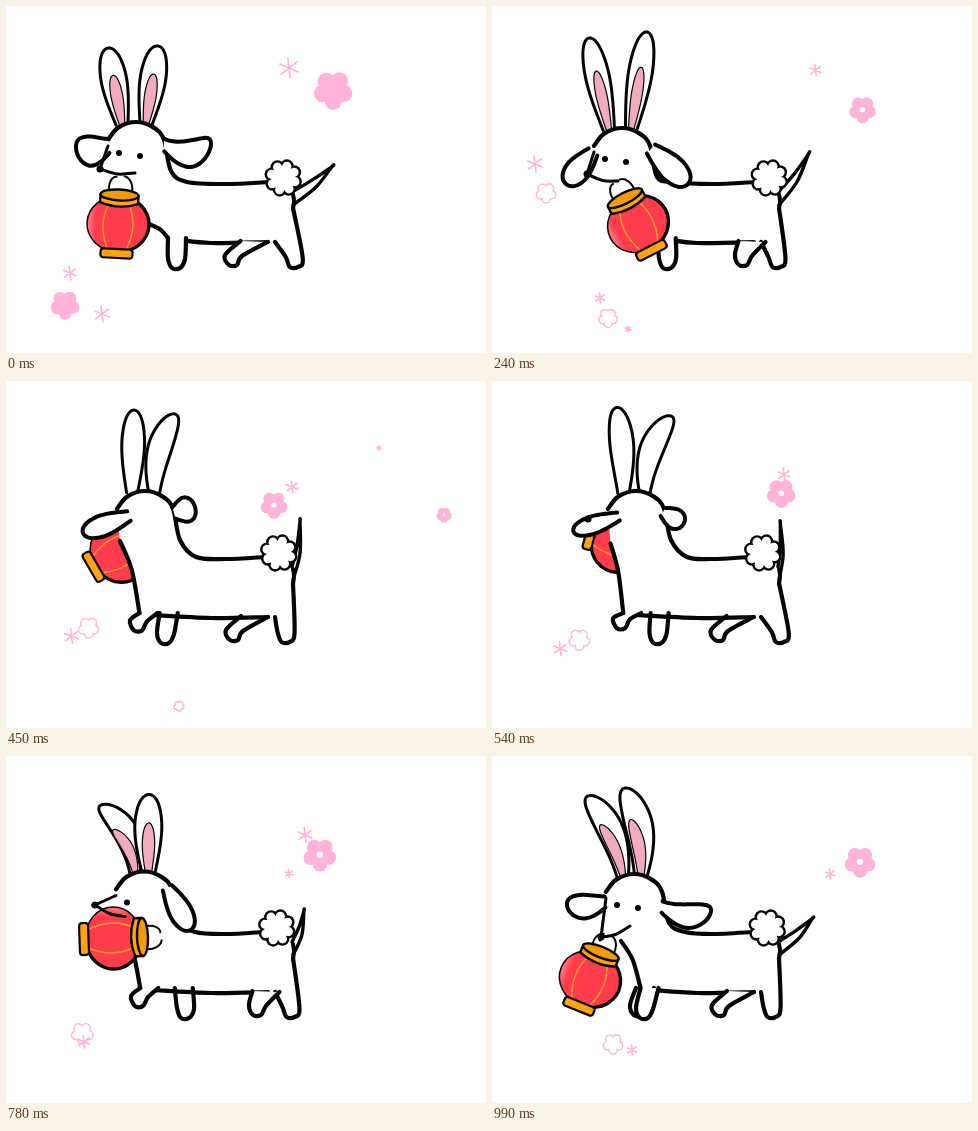
An HTML page with a canvas for the animation above (1.05 s loop, 480 by 347 pixels).

```html
<!DOCTYPE html>
<html lang="en">
<head>
<meta charset="utf-8">
<title>Lantern walk</title>
<style>
html, body { margin: 0; width: 100%; height: 100%; overflow: hidden; background: #fff; }
canvas { display: block; width: 100vw; height: 100vh; }
</style>
</head>
<body>
<canvas id="stage" width="480" height="347"></canvas>
<script>
const ctx = document.getElementById('stage').getContext('2d');
const LOOP = 1050, TICK = 30, STEPS = 10, POSE = LOOP / STEPS;
const INK = '#050505', PINK = '#ffb3da', EAR = '#f2abbd', RED = '#ff3c4c', GOLD = '#ffa30f';
const TAU = Math.PI * 2;

// Puppet poses by step. Ears: tip x, y, width, bend. Flops: root x, y, then the same.
// Face: nose from head centre, then mouth end from nose. Lamp: x, y, degrees.
const keys = {
  0: { head: [130, 147], spread: [12], earL: [102, 42, 27, 0], earR: [152, 40, 27, 0],
    flopL: [103, 140, 70, 142, 31, -8], flopR: [158, 139, 205, 137, 28, 20],
    face: [-36, 16, 35, 4], eyes: [2], throat: [143, 218], feet: [170, 170], lamp: [112, 218, 3] },
  1: { head: [130, 153], spread: [11], earL: [104, 37, 26, 0], earR: [159, 36, 27, 0],
    flopL: [102, 147, 71, 171, 22, 0], flopR: [160, 141, 203, 176, 25, 0],
    face: [-35, 14, 36, 4], eyes: [2], throat: [153, 230], feet: [170, 170], lamp: [129, 217, -17] },
  2: { head: [130, 153], spread: [11], earL: [97, 32, 25, 0], earR: [155, 26, 25, 0],
    flopL: [101, 146, 74, 178, 25, 0], flopR: [159, 143, 196, 178, 27, 0],
    face: [-35, 15, 31, 7], eyes: [2], throat: [160, 240], feet: [175, 175], lamp: [146, 218, -27] },
  4: { head: [139, 141], spread: [11], earL: [128, 29, 24, 0], earR: [169, 33, 25, -12],
    flopL: [123, 135, 77, 152, 22, 0], flopR: [168, 132, 189, 126, 26, 0],
    eyes: [0], throat: [114, 160], feet: [132, 159], lamp: [113, 171, 60], behind: true },
  6: { head: [149, 141], spread: [10], earL: [122, 24, 26, 8], earR: [189, 37, 25, -18],
    flopL: [130, 136, 86, 149, 15, 0], flopR: [174, 130, 194, 160, 16, 0],
    face: [-48, -3, 30, 10], eyes: [0], throat: [123, 165], feet: [126, 172], lamp: [141, 150, 150], behind: true },
  8: { head: [127, 152], spread: [3], earL: [68, 74, 25, 32], earR: [97, 40, 32, 16],
    flopR: [149, 134, 175, 188, 31, 0],
    face: [-50, 8, 30, 13], eyes: [1], throat: [107, 173], feet: [140, 186], lamp: [74, 214, 26] },
  9: { head: [142, 149], spread: [9], earL: [96, 40, 27, 14], earR: [133, 32, 29, 14],
    flopL: [113, 146, 75, 149, 25, -6], flopR: [170, 151, 219, 155, 25, 14],
    face: [-33, 32, 29, -11], eyes: [2], throat: [129, 185], feet: [152, 146], lamp: [98, 223, 22] }
};

// Drifting petals: look, first and last step, path ends, size ends, ease, sway.
const petals = [
  ['fh', 0, 4, 327, 84, 438, 134, 19, 7, 1.35, 0],
  ['*', 0, 4, 283, 62, 373, 67, 10, 2, 1.15, 0],
  ['*', 0, 2, 64, 267, 108, 292, 7, 5, 1, 0],
  ['*', 0, 2, 96, 308, 136, 323, 8, 3, 1, 0],
  ['fo', 0, 4, 59, 299, 173, 325, 14, 5, 1, 0],
  ['o', 2, 8, 54, 187, 64, 285, 10, 11, .45, 26],
  ['*', 2, 8, 43, 158, 84, 293, 8, 6, .3, -8],
  ['h', 4, 8, 268, 124, 324, 93, 13, 17, .7, 0],
  ['*', 4, 8, 286, 106, 302, 73, 6, 8, .7, 0],
  ['*', 6, 8, 275, 129, 291, 106, 2, 6, 1, 0],
  ['h', 9, 9, 368, 106, 0, 0, 15, 0, 1, 0],
  ['*', 9, 9, 338, 118, 0, 0, 5, 0, 1, 0],
  ['o', 9, 9, 121, 288, 0, 0, 10, 0, 1, 0],
  ['*', 9, 9, 140, 294, 0, 0, 5, 0, 1, 0]
];

const mix = (a, b, t) => a + (b - a) * t;

function pose(k) {
  if (keys[k]) return keys[k];
  const a = keys[k - 1], b = keys[k + 1], out = { behind: a.behind && b.behind };
  for (const part in a) {
    if (Array.isArray(a[part]) && b[part]) out[part] = a[part].map((v, i) => mix(v, b[part][i], .5));
  }
  out.face = out.face || a.face || b.face;
  return out;
}

function paint(fill, line, width) {
  if (fill) { ctx.fillStyle = fill; ctx.fill(); }
  if (line) { ctx.strokeStyle = line; ctx.lineWidth = width; ctx.stroke(); }
}

// Catmull-Rom through the points; a doubled point makes a corner.
function curve(pts) {
  ctx.beginPath();
  ctx.moveTo(...pts[0]);
  for (let i = 0; i < pts.length - 1; i++) {
    const [p, q, r, s] = [pts[i - 1] || pts[i], pts[i], pts[i + 1], pts[i + 2] || pts[i + 1]];
    ctx.bezierCurveTo(q[0] + (r[0] - p[0]) / 6, q[1] + (r[1] - p[1]) / 6,
      r[0] - (s[0] - q[0]) / 6, r[1] - (s[1] - q[1]) / 6, ...r);
  }
}

function disc(x, y, r, fill) {
  ctx.beginPath();
  ctx.arc(x, y, r, 0, TAU);
  paint(fill);
}

// Rounded lobe around a bent centre line, open at its root.
function lobe(x0, y0, x1, y1, width, bend) {
  const dx = x1 - x0, dy = y1 - y0, len = Math.hypot(dx, dy), left = [], right = [];
  for (let i = 0; i <= 20; i++) {
    const u = Math.sin(i / 20 * TAU / 4), arc = 2 * u * (1 - u) * bend;
    const rise = Math.sin(Math.min(1, u / .7) * TAU / 4);
    const half = width / 2 * (.45 + .55 * rise) * Math.sqrt(Math.max(0, 1 - u ** 5));
    const at = d => [x0 + dx * u - dy / len * d, y0 + dy * u + dx / len * d];
    left.push(at(arc - half));
    right.unshift(at(arc + half));
  }
  curve([...left, ...right]);
}

function ear(x, y, [tx, ty, width, bend], lining) {
  lobe(x, y, tx, ty, width, bend);
  paint('#fff', INK, 3);
  if (!lining) return;
  lobe(x, y, mix(x, tx, .64), mix(y, ty, .64), width * .46, bend * .45);
  paint(EAR, INK, 1.2);
}

function flop(shape) {
  if (!shape) return;
  lobe(...shape);
  paint('#fff', INK, 4);
}

function leg(x0, y0, x1, y1, fx, fy) {
  curve([[x0, y0], [fx - 8, fy - 11], [fx - 4, fy - 1], [fx + 4, fy - 1], [fx + 9, fy - 10], [x1, y1]]);
  paint('#fff', INK, 4.2);
}

function frontLeg(foot) {
  const hip = hipOf(foot);
  leg(hip - 9, 232, hip + 9, 232, foot, 263 - Math.max(0, 150 - foot) * .7);
}
const hipOf = foot => 156 + .75 * (foot - 150);

// Ring of discs, drawn larger for the outline and smaller for the fill.
function puff(x, y, r, n, fill, line, width) {
  const small = r * (n > 5 ? .32 : .42);
  for (const [grow, colour] of [[width / 2, line], [-width / 2, fill]]) {
    for (let i = 0; i < n; i++) {
      const a = .3 + i / n * TAU;
      disc(x + Math.cos(a) * (r - small), y + Math.sin(a) * (r - small), small + grow, colour);
    }
    disc(x, y, r - small, colour);
  }
}

function petal(k, [look, from, to, x0, y0, x1, y1, r0, r1, ease, sway]) {
  if (k < from || k > to) return;
  const age = (k - from) / (to - from || 1), e = age ** ease;
  const x = mix(x0, x1, e) + sway * Math.sin(age * Math.PI), y = mix(y0, y1, e), r = mix(r0, r1, age);
  const kind = age < .4 ? look[0] : look.slice(-1);
  if (kind === '*') {
    ctx.beginPath();
    for (let i = 0; i < 3; i++) {
      const a = .4 + i * TAU / 6, c = Math.cos(a) * r, s = Math.sin(a) * r;
      ctx.moveTo(x - c, y - s);
      ctx.lineTo(x + c, y + s);
    }
    return paint(null, PINK, 1.6);
  }
  puff(x, y, r, 5, kind === 'o' ? '#fff' : PINK, PINK, 1.4);
  if (kind === 'h') disc(x, y, r * .2, '#fff');
}

function lantern([x, y, deg]) {
  ctx.save();
  ctx.translate(x, y);
  ctx.rotate(deg * TAU / 360);

  ctx.beginPath();
  ctx.moveTo(-10, -30);
  ctx.bezierCurveTo(-13, -41, -8, -47, -4, -47);
  ctx.moveTo(12, -30);
  ctx.bezierCurveTo(14, -41, 9, -47, 4, -48);
  paint(null, INK, 2);

  const glow = ctx.createLinearGradient(-31, 0, 0, 0);
  glow.addColorStop(0, '#ff7f88');
  glow.addColorStop(.3, RED);
  ctx.beginPath();
  ctx.ellipse(0, 0, 31, 28, 0, 0, TAU);
  paint(glow, INK, 1.5);
  ctx.beginPath();
  ctx.ellipse(0, 0, 31, 28, 0, -1, 1.6);
  paint(null, INK, 3.4);

  ctx.beginPath();
  for (const s of [-1, 1]) {
    ctx.moveTo(s * 9, -22);
    ctx.quadraticCurveTo(s * 21, 0, s * 9, 26);
  }
  paint(null, '#ff9a2a', 1.5);

  ctx.beginPath();
  ctx.roundRect(-16, 25, 32, 9, 3);
  paint(GOLD, INK, 2.2);
  ctx.beginPath();
  ctx.moveTo(-19, -29);
  ctx.lineTo(-19, -21);
  ctx.quadraticCurveTo(0, -14, 19, -21);
  ctx.lineTo(19, -29);
  paint(GOLD, INK, 2.4);
  ctx.beginPath();
  ctx.ellipse(0, -29, 19, 5.5, 0, 0, TAU);
  paint('#f59a08', INK, 2.4);
  ctx.restore();
}

function tail(k) {
  const tip = [307 + 19 * Math.cos((k - .3) / STEPS * TAU), 152 + 11 * Math.cos((k - 9) / STEPS * TAU)];
  const mid = mix(288, tip[0], .5);
  curve([[286, 186], [mid, mix(184, tip[1], .45)], tip, tip, [mid + 3, mix(198, tip[1], .45)], [287, 199]]);
  paint('#fff', INK, 3.4);
}

// The hind feet share one stride, two paces per loop.
function hindLegs(k, away) {
  const stride = (k - .8) / STEPS * 2 * TAU;
  const inner = 238 + 13 * Math.sin(stride), hip = 262 + .5 * (inner - 262);
  const pair = [
    () => leg(hip - 10, 235, hip + 17, 236, inner, 260),
    () => leg(269, 236, 287, 202, 284 + 7 * Math.cos(stride), 262)
  ];
  return away ? pair : pair.reverse();
}

function draw(k) {
  const p = pose(k), [hx, hy] = p.head, [spread] = p.spread, eyes = Math.round(p.eyes[0]);
  const pom = 274 + 4 * Math.cos((k - 1) / STEPS * TAU);
  const hip = hipOf(p.feet[0]) - 9, [tx, ty] = p.throat;

  ctx.fillStyle = '#fff';
  ctx.fillRect(0, 0, 480, 347);
  ctx.lineCap = ctx.lineJoin = 'round';
  petals.forEach(s => petal(k, s));

  ear(hx - 2 - spread, hy - 29, p.earL, eyes);
  ear(hx - 2 + spread, hy - 29, p.earR, eyes);
  if (p.behind) lantern(p.lamp);

  const [farHind, nearHind] = hindLegs(k, !eyes);
  const dome = [205, 235, 270, 305, 335].map(d =>
    [hx + 31 * Math.cos(d * TAU / 360), hy + 31 * Math.sin(d * TAU / 360)]);
  const spine = [...dome, [hx + 35, hy + 18], [hx + 51, 176], [220, 178], [pom - 14, 176]];
  const chest = [[tx, ty], [mix(tx, hip, .6), mix(ty, 232, .4)], [hip, 232]];

  curve([...spine, [287, 190], [287, 236], [hip, 236], ...chest.reverse()]);
  paint('#fff');
  tail(k);
  if (p.feet[1] !== p.feet[0]) frontLeg(p.feet[1]);
  farHind();
  curve([[hip + 12, 234], [205, 237], [262, 236]]);
  paint(null, INK, 4.2);
  frontLeg(p.feet[0]);
  nearHind();
  curve(chest);
  paint(null, INK, 4.2);
  curve([[287, 188], [288, 195], [287, 203]]);
  paint(null, INK, 4);
  curve(spine);
  paint(null, INK, 4.2);
  flop(p.flopL);
  flop(p.flopR);
  puff(pom, 172, 18, 8, '#fff', INK, 2.4);
  if (!p.behind) lantern(p.lamp);

  if (!p.face) return;
  const [nx, ny, mx, my] = p.face, nose = [hx + nx, hy + ny];
  if (eyes) {
    curve([[hx - 28, hy - 7], nose, nose, [nose[0] + mx / 2, nose[1] + my / 2 + 3], [nose[0] + mx, nose[1] + my]]);
    paint(null, INK, 3);
    disc(hx - 17, hy, 3, INK);
    if (eyes > 1) disc(hx + 4, hy + 3, 3, INK);
  }
  disc(...nose, 3.5, INK);
}

function frame(now) {
  const t = Math.floor(now % LOOP / TICK) * TICK;
  draw(Math.floor(t / POSE));
  requestAnimationFrame(frame);
}
frame(performance.now());
</script>
</body>
</html>
```
